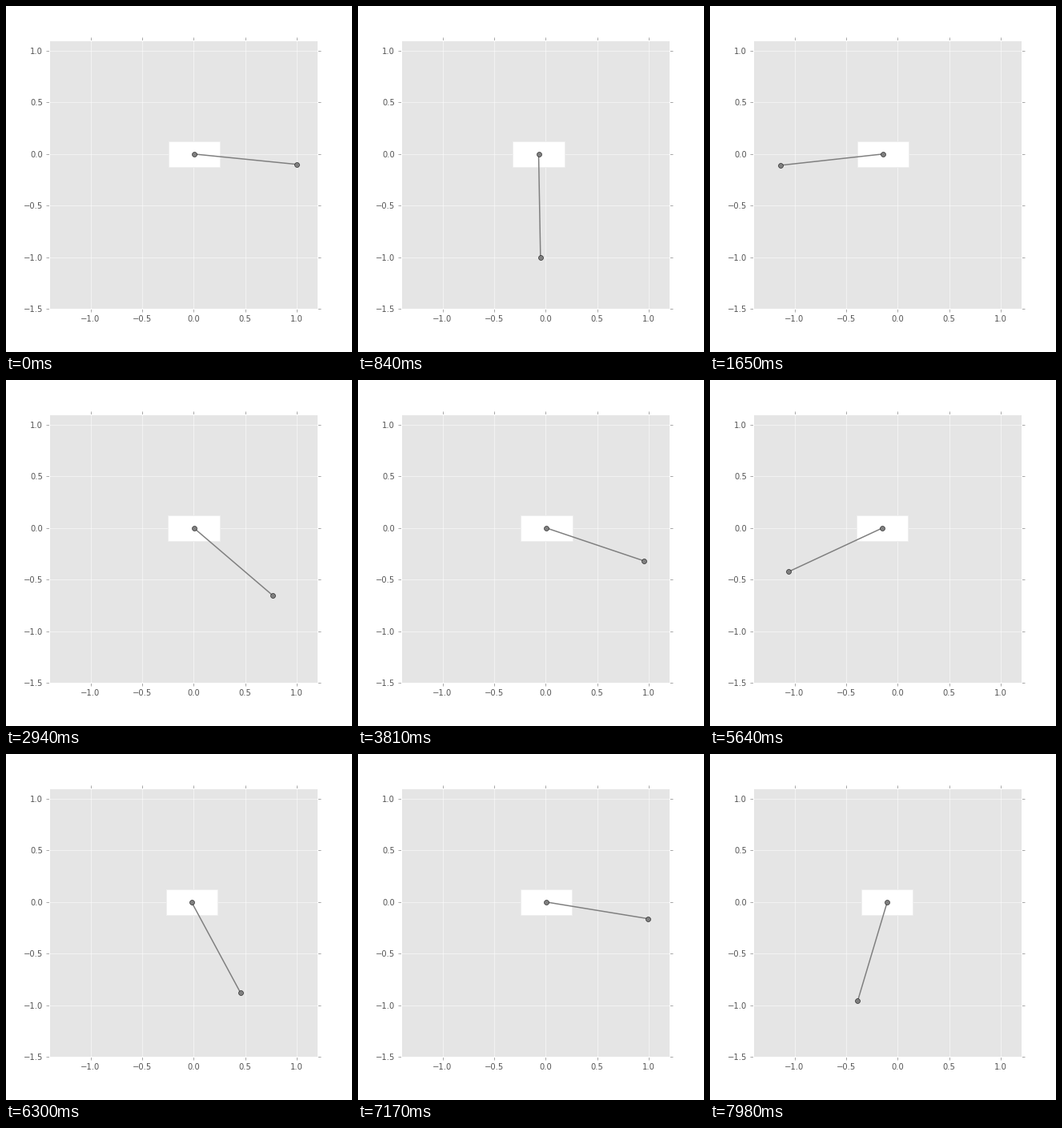
A matplotlib script that plays this animation: 432 px wide and 432 px high, repeating every 8000 ms.

```python
import math

import matplotlib.pyplot as plt
from matplotlib.animation import FuncAnimation
from matplotlib.patches import Rectangle

LOOP = 8000                     # ms
FRAMES = 267
STEP = 30                       # ms of motion per frame
SWING = math.radians(84.4)      # amplitude
RATE = 0.0020658                # natural frequency, rad per ms
LEAD = 32                       # ms since the last turning point
CART_W, CART_H = 0.5, 0.25
INK = "#555555"


def swing_angles(count):
    """Large-angle pendulum released at rest, one value per millisecond."""
    angle, speed = SWING, 0.0
    angles = []
    for _ in range(count):
        angles.append(angle)
        speed -= RATE ** 2 * math.sin(angle) / 2
        angle += speed
        speed -= RATE ** 2 * math.sin(angle) / 2
    return angles


ANGLES = swing_angles(LEAD + FRAMES * STEP)


def pose(n):
    """Cart centre and bob position in frame n."""
    angle = ANGLES[LEAD + n * STEP]
    s, c = math.sin(angle), math.cos(angle)
    cart = -0.07 + 0.07 * s + 0.04 * s * c
    return cart, cart + s, -c


plt.rcParams.update({
    "font.family": "DejaVu Sans",
    "font.size": 10,
    "axes.unicode_minus": True,
})

fig = plt.figure(figsize=(6, 6), dpi=72, facecolor="white")
ax = fig.add_axes([0.125, 0.125, 0.775, 0.775], facecolor="#E5E5E5")
ax.set_xlim(-1.4, 1.2)
ax.set_ylim(-1.5, 1.1)
ax.set_xticks([-1, -0.5, 0, 0.5, 1])
ax.set_yticks([-1.5, -1, -0.5, 0, 0.5, 1])
ax.xaxis.set_major_formatter("{x:.1f}")
ax.yaxis.set_major_formatter("{x:.1f}")
ax.tick_params(direction="out", length=4, width=0.5, pad=4, color=INK,
               labelcolor=INK, top=True, right=True)
ax.grid(True, color="white", linestyle="-", linewidth=0.5)
ax.set_axisbelow(True)
for spine in ax.spines.values():
    spine.set_color("white")
    spine.set_linewidth(1)
for axis in (ax.xaxis, ax.yaxis):
    for label in axis.get_ticklabels():
        label.set_text(label.get_text().replace("-", "\u2212"))

cart = Rectangle((0, -CART_H / 2), CART_W, CART_H,
                 facecolor="white", edgecolor="#EEEEEE", linewidth=1)
ax.add_patch(cart)
rod, = ax.plot([], [], "o-", color="#7F7F7F", linewidth=1.5, markersize=6,
               markeredgecolor="black", markeredgewidth=0.5)


def draw(n):
    x, bob_x, bob_y = pose(n)
    cart.set_x(x - CART_W / 2)
    rod.set_data([x, bob_x], [0, bob_y])
    return cart, rod


anim = FuncAnimation(fig, draw, frames=FRAMES, init_func=lambda: draw(0),
                     interval=LOOP / FRAMES, repeat=True, repeat_delay=0,
                     blit=False)
plt.show()
```
